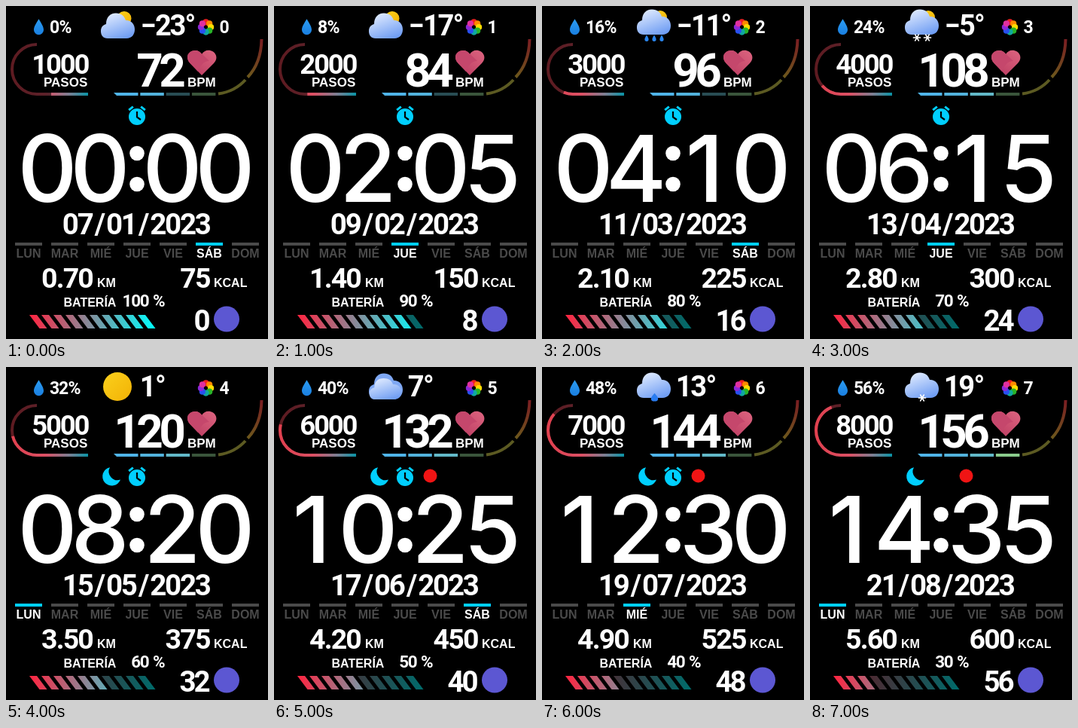
Animation of 348 by 442 pixels, one loop 8 s. Source, as an HTML page:

```html
<!DOCTYPE html>
<html lang="es">
<head>
<meta charset="utf-8">
<title>Reloj</title>
<style>
html, body { margin: 0; width: 100%; height: 100%; overflow: hidden; background: #000; }
svg { display: block; width: 100vw; height: 100vh; }
.num { font-family: Roboto, sans-serif; font-weight: 600; font-stretch: 87%; fill: #fff; text-anchor: middle; }
.big { font-family: Inter, sans-serif; font-weight: 500; font-size: 123px; fill: #fff; text-anchor: middle; }
.lab { font-family: "Liberation Sans", Arial, sans-serif; font-weight: 700; font-size: 16px; fill: #fff; }
</style>
</head>
<body>
<svg id="stage" viewBox="0 0 348 442">
  <defs>
    <linearGradient id="ring" gradientUnits="userSpaceOnUse" x1="6" y1="0" x2="109" y2="0">
      <stop offset="0" stop-color="#e0404e"/><stop offset=".45" stop-color="#dc5064"/>
      <stop offset=".75" stop-color="#7d7e92"/><stop offset="1" stop-color="#0a93a5"/>
    </linearGradient>
    <linearGradient id="charge" gradientUnits="userSpaceOnUse" x1="31" y1="0" x2="198" y2="0">
      <stop offset="0" stop-color="#ff2440"/><stop offset="1" stop-color="#00ffff"/>
    </linearGradient>
    <linearGradient id="hot" gradientUnits="userSpaceOnUse" x1="320" y1="96" x2="340" y2="46">
      <stop offset="0" stop-color="#6b5a1c"/><stop offset="1" stop-color="#7a1f22"/>
    </linearGradient>
    <linearGradient id="cloudFill" x1=".2" y1="0" x2=".7" y2="1">
      <stop offset="0" stop-color="#e3edff"/><stop offset="1" stop-color="#6f9df3"/>
    </linearGradient>
    <linearGradient id="sunFill" x1="0" y1="0" x2="1" y2="1">
      <stop offset="0" stop-color="#fbd01c"/><stop offset="1" stop-color="#f2b205"/>
    </linearGradient>
    <linearGradient id="dropFill" x1="0" y1="0" x2="0" y2="1">
      <stop offset="0" stop-color="#2b9cf2"/><stop offset="1" stop-color="#1a7fe0"/>
    </linearGradient>
    <linearGradient id="heartFill" x1="1" y1="0" x2="0" y2="1">
      <stop offset="0" stop-color="#dd6580"/><stop offset="1" stop-color="#b8385f"/>
    </linearGradient>
    <path id="cloud" d="M135 43C129 43 126 39 126 33.500C126 28 129 25 133 24C133 15 138 9.500 146 9.500C153 9.500 157 13 159 19C166 18.500 171 24 171 31C171 38 167 43 160 43Z"/>
    <path id="drop" d="M0 -4.500C1.500 -2 2.600 -.5 2.600 1.300A2.600 2.600 0 0 1 -2.600 1.300C-2.600 -.5 -1.500 -2 0 -4.500Z"/>
    <path id="flake" d="M-4.500 0H4.500M-2.250 -3.900L2.250 3.900M2.250 -3.900L-2.250 3.900" stroke="#fff" stroke-width="1.700" stroke-linecap="round"/>
  </defs>
  <rect width="348" height="442"/>

  <use href="#drop" transform="translate(43.500 28.500) scale(2.500)" fill="url(#dropFill)"/>
  <g id="sky"></g>
  <g id="petals"></g>

  <g fill="none" stroke="url(#ring)" stroke-width="4">
    <path d="M109 117H41A33 33 0 0 1 41 51" opacity=".42"/>
    <path id="stepArc" d="M109 117H41A33 33 0 0 1 41 51"/>
  </g>
  <g id="zones"></g>
  <path d="M282 116.500C297 114.500 309 108 318 98" fill="none" stroke="#5c5a22" stroke-width="4"/>
  <path d="M321 94.500C333 82 339 66 339.500 44" fill="none" stroke="url(#hot)" stroke-width="4"/>

  <path d="M260 92L244.500 76C239 70 240 62.500 247 59.700C253 57.700 258 60 260 64C263 59 269 57 275 60.500C280.500 64.500 281 71 276 76Z" fill="url(#heartFill)"/>
  <path d="M244.500 76C239 70 240 62.500 247 59.700C253 57.700 257 60 260 63.500L270 73C262 73 257 80 255 87Z" fill="#c5476c"/>

  <path id="moon" d="M138 133.200A12.300 12.300 0 1 0 152 149.500A11.500 11.500 0 0 1 138 133.200Z" fill="#00cfff"/>
  <g id="alarm">
    <circle cx="174" cy="147" r="11" fill="#00cfff"/>
    <path d="M163.200 138.200L168.800 133.600M184.800 138.200L179.200 133.600" stroke="#00cfff" stroke-width="3"/>
    <path d="M174 140V147.500L179 151" fill="none" stroke="#000" stroke-width="2.200"/>
  </g>
  <circle id="link" cx="207.500" cy="144.500" r="9" fill="#f01414"/>

  <g id="clock"></g>
  <circle cx="174" cy="195.500" r="9.800" fill="#fff"/>
  <circle cx="174" cy="236.500" r="9.800" fill="#fff"/>
  <g id="week"></g>
  <g id="bars" fill="url(#charge)"></g>
  <circle cx="293" cy="415.500" r="17" fill="#5c57d2"/>

  <g class="lab">
    <text x="50" y="107" style="font-size:17px">PASOS</text>
    <text x="241" y="107" style="font-size:17px">BPM</text>
    <text x="121" y="373">KM</text>
    <text x="276" y="373">KCAL</text>
    <text x="76.500" y="399">BATERÍA</text>
  </g>
  <g id="values"></g>
</svg>
<script>
const $ = id => document.getElementById(id);

function add(parent, tag, attrs, text) {
  const el = document.createElementNS("http://www.w3.org/2000/svg", tag);
  for (const key in attrs) el.setAttribute(key, attrs[key]);
  if (text !== undefined) el.textContent = text;
  return parent.appendChild(el);
}

// Advance of non-digit characters, relative to a digit.
const WIDTH = { ".": .48, "/": .94, "−": 1.03, "°": .7, "%": 1.4, " ": .45 };

// A line of fixed-pitch digits; anchored left, or right when end is true.
function readout(x, y, size, pitch, end) {
  const el = add($("values"), "text", { class: "num", y, style: `font-size:${size}px` });
  return str => {
    const widths = [...str].map(c => pitch * (WIDTH[c] || 1));
    let pos = end ? x - widths.reduce((a, b) => a + b, 0) : x;
    el.setAttribute("x", widths.map(w => (pos += w) - w / 2).join(" "));
    el.textContent = str;
  };
}

const show = {
  humidity: readout(58.5, 35.5, 23, 12, false),
  temp: readout(179, 39, 38, 19.5, false),
  uv: readout(284, 35.5, 23, 12, false),
  steps: readout(110.5, 90, 36.5, 18.8, true),
  bpm: readout(236, 107, 62, 30, true),
  date: readout(76, 302.5, 38.5, 19.8, false),
  km: readout(48, 374, 37.5, 19.5, false),
  kcal: readout(271.5, 374, 37.5, 19.7, true),
  battery: readout(211.5, 399, 22.5, 11.6, true),
  score: readout(270, 430.5, 38.5, 19, true)
};

const petals = ["#f02020", "#ff8a00", "#ffdc00", "#28b428", "#10a8a0", "#2850f0", "#8c28d8", "#e030a0"];
petals.forEach((fill, i) => {
  const a = (i - 2) * Math.PI / 4;
  add($("petals"), "circle", { cx: 265.5 + 6.6 * Math.cos(a), cy: 28 + 6.6 * Math.sin(a), r: 4.1, fill });
});

const zones = ["#4fb4e8", "#52b2dc", "#62b8c8", "#8acb8c"].map((fill, i) => {
  const x = 144 + i * 34.3;
  return add($("zones"), "path", { d: `M${x - (i ? 0 : 1)} 115H${x + 31.5}V119H${x + (i ? 0 : 3)}Z`, fill });
});

const bars = Array.from({ length: 10 }, (_, i) =>
  add($("bars"), "path", { d: `M${31 + i * 16} 410h10l13.500 18h-10Z` }));

const days = ["LUN", "MAR", "MIÉ", "JUE", "VIE", "SÁB", "DOM"].map((name, i) => ({
  bar: add($("week"), "rect", { x: 12 + i * 48, y: 314, width: 36, height: 4 }),
  text: add($("week"), "text", { class: "lab", x: 30 + i * 48, y: 334, "text-anchor": "middle" }, name)
}));

const slots = [55, 125, 221, 291];
const digits = slots.map(() => add($("clock"), "text", { class: "big", y: 260 }));

const cloud = dy => `<use href="#cloud" y="${dy}" fill="url(#cloudFill)"/>`;
const sun = (x, y, r) => `<circle cx="${x}" cy="${y}" r="${r}" fill="url(#sunFill)"/>`;
const row = (kind, y, xs) => xs.map(x => `<use href="#${kind}" x="${x}" y="${y}" fill="#2a86f0"/>`).join("");
const partly = sun(157, 16.5, 9.5) + cloud(0);
const sky = [
  partly,
  partly,
  sun(157, 15, 9) + cloud(-5) + row("drop", 43, [139, 149, 159]),
  sun(157, 15, 9) + cloud(-5) + row("flake", 42, [142, 156]),
  sun(148, 26, 19),
  `<use href="#cloud" y="-1" fill="#7fa8f4"/><use href="#cloud" transform="translate(7 7) scale(.95 .84)" fill="url(#cloudFill)"/>`,
  cloud(-2) + `<use href="#drop" transform="translate(149.500 40.500) scale(1.800 1.300)" fill="#2a7cf0"/>`,
  cloud(-2) + row("flake", 41, [149])
];

const pad = n => String(n).padStart(2, "0");
const toggle = (id, on) => $(id).setAttribute("visibility", on ? "visible" : "hidden");
const lit = (el, on) => el.setAttribute("opacity", on ? 1 : .42);

function draw(k) {
  const temp = 6 * k - 23, bpm = 72 + 12 * k, charge = 10 - k;
  show.humidity(8 * k + "%");
  show.temp((temp < 0 ? "−" : "") + Math.abs(temp) + "°");
  show.uv(String(k));
  show.steps(String(1000 * (k + 1)));
  show.bpm(String(bpm));
  show.date(`${pad(7 + 2 * k)}/${pad(k + 1)}/2023`);
  show.km((.7 * (k + 1)).toFixed(2));
  show.kcal(String(75 * (k + 1)));
  show.battery(charge * 10 + " %");
  show.score(String(8 * k));

  [...(pad(2 * k) + pad(5 * k))].forEach((c, i) => {
    digits[i].setAttribute("x", slots[i] - (c === "1" ? 5 : 0));
    digits[i].textContent = c;
  });

  const today = (new Date(2023, k, 7 + 2 * k).getDay() + 6) % 7;
  days.forEach((d, i) => {
    d.bar.setAttribute("fill", i === today ? "#00cfff" : "#4a4a4a");
    d.text.style.fill = i === today ? "#fff" : "#4a4a4a";
  });

  $("stepArc").setAttribute("stroke-dasharray", `${49 + 15.7 * k} 400`);
  const zone = bpm < 108 ? 2 : bpm < 156 ? 3 : 4;
  zones.forEach((el, i) => lit(el, i < zone));
  bars.forEach((el, i) => lit(el, i < charge));

  $("sky").innerHTML = sky[k];
  toggle("moon", k >= 4);
  toggle("alarm", k < 7);
  toggle("link", k >= 5);
}

let last = -1;
function tick() {
  const k = Math.floor(performance.now() / 1000) % 8;
  if (k !== last) draw(last = k);
  requestAnimationFrame(tick);
}
tick();
</script>
</body>
</html>
```
